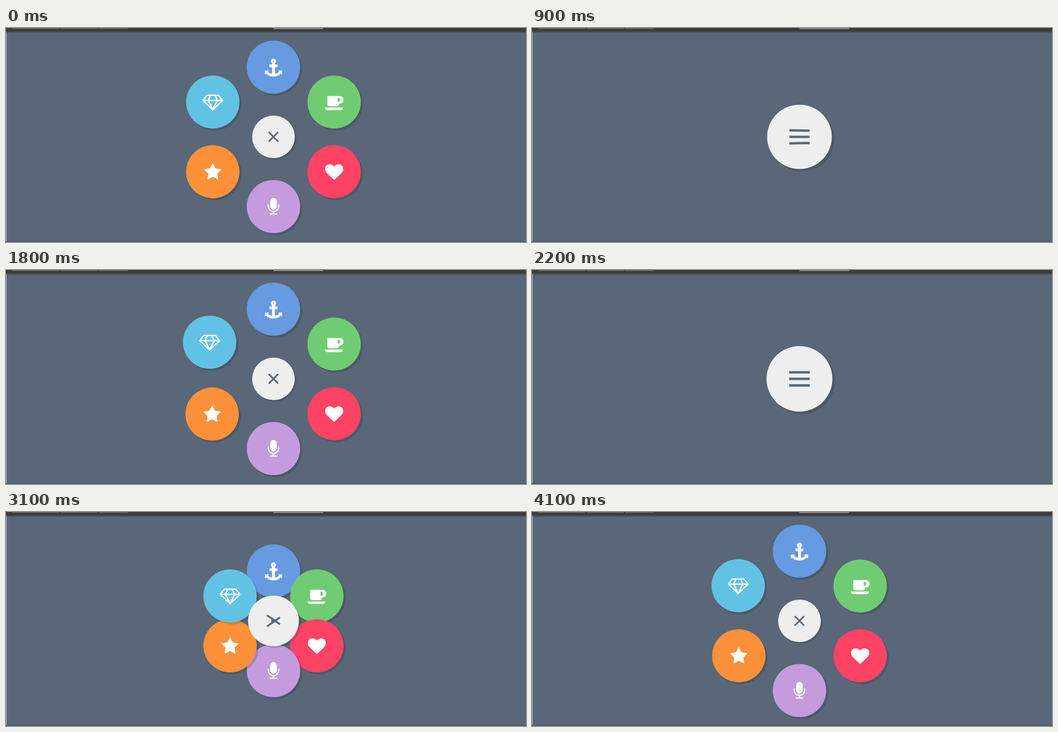
An HTML page for the animation above (4500 ms loop, 974 by 403 pixels).

```html
<!DOCTYPE html>
<html lang="en">
<head>
<meta charset="utf-8">
<title>Radial menu</title>
<style>
html, body { margin: 0; width: 100%; height: 100%; overflow: hidden; background: #596778; }
svg { display: block; }
.icon { fill: #fff; fill-rule: evenodd; stroke: #fff; stroke-width: 0; stroke-linejoin: round; }
.anchor { stroke-width: 40; }
.diamond { fill: none; stroke-width: 128; stroke-linejoin: miter; }
</style>
</head>
<body>
<svg width="974" height="403" viewBox="0 0 974 403">
  <defs>
    <linearGradient id="fade" x2="0" y2="1">
      <stop stop-color="#000" stop-opacity=".35"/>
      <stop offset="1" stop-color="#000" stop-opacity="0"/>
    </linearGradient>
  </defs>
  <rect width="974" height="403" fill="#596778"/>
  <rect y="6" width="1" height="397" fill="#c4c9d0"/>
  <rect y="401" width="974" height="2" fill="#4f5b70"/>
  <rect y="6" width="974" height="4" fill="url(#fade)"/>
  <rect width="974" height="6" fill="#3d3c3b"/>
  <path d="M12 0h88v2h-88zM102 0h70v2h-70zM174 0h54v2h-54z" fill="#62615f"/>
  <path d="M501 0h93v2h-93z" fill="#8b8a88"/>
  <g id="menu" transform="translate(501 205)"></g>
</svg>
<script>
const LOOP = 4500, STEP = 100, RADIUS = 131.25;
const menu = document.getElementById('menu');

// Each item: name, colour, horizontal middle of the icon, icon outline.
const items = [
  ['anchor', '#669ae1', 896, 'M64 1568V1216H416L316 1316Q470 1500 780 1535V840H520V610H780V478A240 240 0 1 1 1012 478V610H1272V840H1012V1535Q1322 1500 1476 1316L1376 1216H1728V1568L1612 1475Q1370 1770 896 1770Q422 1770 180 1475ZM822 256a74 74 0 1 0 148 0a74 74 0 1 0-148 0z'],
  ['cup', '#70cc72', 1056, 'M1664 640q0-80-56-136t-136-56h-64v384h64q80 0 136-56t56-136zM128 1408h1792q0 106-75 181t-181 75H384q-106 0-181-75t-75-181zM1984 640q0 159-112 271t-272 113h-64v32q0 92-66 158t-158 66H608q-92 0-158-66t-66-158V320q0-26 19-45t45-19H1600q159 0 272 113t112 271z'],
  ['heart', '#fe4365', 896, 'M896 1664q-26 0-44-18L228 1044Q0 820 0 596Q0 376 127 252T478 128Q680 128 896 344Q1112 128 1314 128Q1538 128 1665 252T1792 596Q1792 817 1563 1046L940 1646q-18 18-44 18z'],
  ['microphone', '#c49cde', 896, 'M1472 704v128a576 576 0 0 1-512 572v132h256a64 64 0 0 1 0 128H576a64 64 0 0 1 0-128h256v-132a576 576 0 0 1-512-572V704a64 64 0 0 1 128 0v128a448 448 0 0 0 896 0V704a64 64 0 0 1 128 0zM1216 320v512a320 320 0 0 1-640 0V320a320 320 0 0 1 640 0z'],
  ['star', '#fc913a', 896, 'M1728 647q0 22-26 48l-363 354 86 500q6 70-40 70-19 0-40-12L896 1371 447 1607q-22 12-40 12-46 0-40-70l86-500L90 695q-26-27-26-48 0-37 56-46l502-73 225-455q19-41 49-41t49 41l225 455 502 73q56 9 56 46z'],
  ['diamond', '#62c2e4', 1024, 'M448 192H1600L1984 704 1024 1640 64 704ZM64 704H1984M796 192 570 704 1024 1600 1478 704 1252 192']
];

// Times at which the menu is toggled.
const toggles = [
  { at: -LOOP, open: true },
  { at: 733, open: false }, { at: 1233, open: true },
  { at: 1933, open: false }, { at: 2300, open: true },
  { at: 3067, open: false }, { at: 3433, open: true }
];

function add(parent, tag, attrs = {}) {
  const node = document.createElementNS('http://www.w3.org/2000/svg', tag);
  for (const key in attrs) node.setAttribute(key, attrs[key]);
  return parent.appendChild(node);
}

function disc(fill) {
  const group = add(menu, 'g');
  add(group, 'circle', { cx: 3.75, cy: 3.75, r: 50, fill: '#000', opacity: 0.14 });
  add(group, 'circle', { r: 50, fill });
  return group;
}

function bezier(x1, y1, x2, y2) {
  const curve = (a, b, s) => 3 * (1 - s) ** 2 * s * a + 3 * (1 - s) * s * s * b + s ** 3;
  return x => {
    if (x >= 1) return 1;
    let low = 0, high = 1;
    for (let i = 0; i < 24; i++) {
      const mid = (low + high) / 2;
      if (curve(x1, x2, mid) < x) low = mid; else high = mid;
    }
    return curve(y1, y2, low);
  };
}

const ease = bezier(0.25, 0.1, 0.25, 1);
const easeOut = bezier(0, 0, 0.58, 1);
const flyOut = bezier(0.935, 0, 0.34, 1.33);
const backOut = bezier(0.175, 0.885, 0.32, 1.275);

const discs = items.map(([name, color, middle, d]) => {
  const group = disc(color);
  add(group, 'path', { d, class: 'icon ' + name, transform: `translate(0 -16.3) scale(.019) translate(${-middle})` });
  return group;
});
const button = disc('#eee');
const bars = [-1, 0, 1].map(() =>
  add(button, 'rect', { x: -15.625, y: -1.875, width: 31.25, height: 3.75, fill: '#596778' }));

function draw(time) {
  const { at, open } = toggles.findLast(toggle => toggle.at <= time);
  const age = time - at;

  discs.forEach((group, i) => {
    const reach = RADIUS * (open ? flyOut(age / (180 + 100 * i)) : 1 - easeOut(age / 180));
    const angle = (i * 60 - 90) * Math.PI / 180;
    group.setAttribute('transform', `translate(${reach * Math.cos(angle)} ${reach * Math.sin(angle)})`);
  });

  const scale = open ? 1.2 - 0.4 * Math.min(1, age / 200) : 0.8 + 0.4 * backOut(age / 400);
  button.setAttribute('transform', `scale(${scale})`);

  const cross = open ? ease(age / 200) : 1 - ease(age / 200);
  bars[0].setAttribute('transform', `translate(0 ${-10 * (1 - cross)}) rotate(${45 * cross})`);
  bars[1].setAttribute('transform', `scale(${1 - 0.9 * cross} 1)`);
  bars[2].setAttribute('transform', `translate(0 ${10 * (1 - cross)}) rotate(${-45 * cross})`);
}

// The picture advances ten times a second; the small lead absorbs display latency.
const start = performance.now();
function tick() {
  const time = (performance.now() - start + 15) % LOOP;
  draw(Math.floor(time / STEP) * STEP);
  requestAnimationFrame(tick);
}
tick();
</script>
</body>
</html>
```
